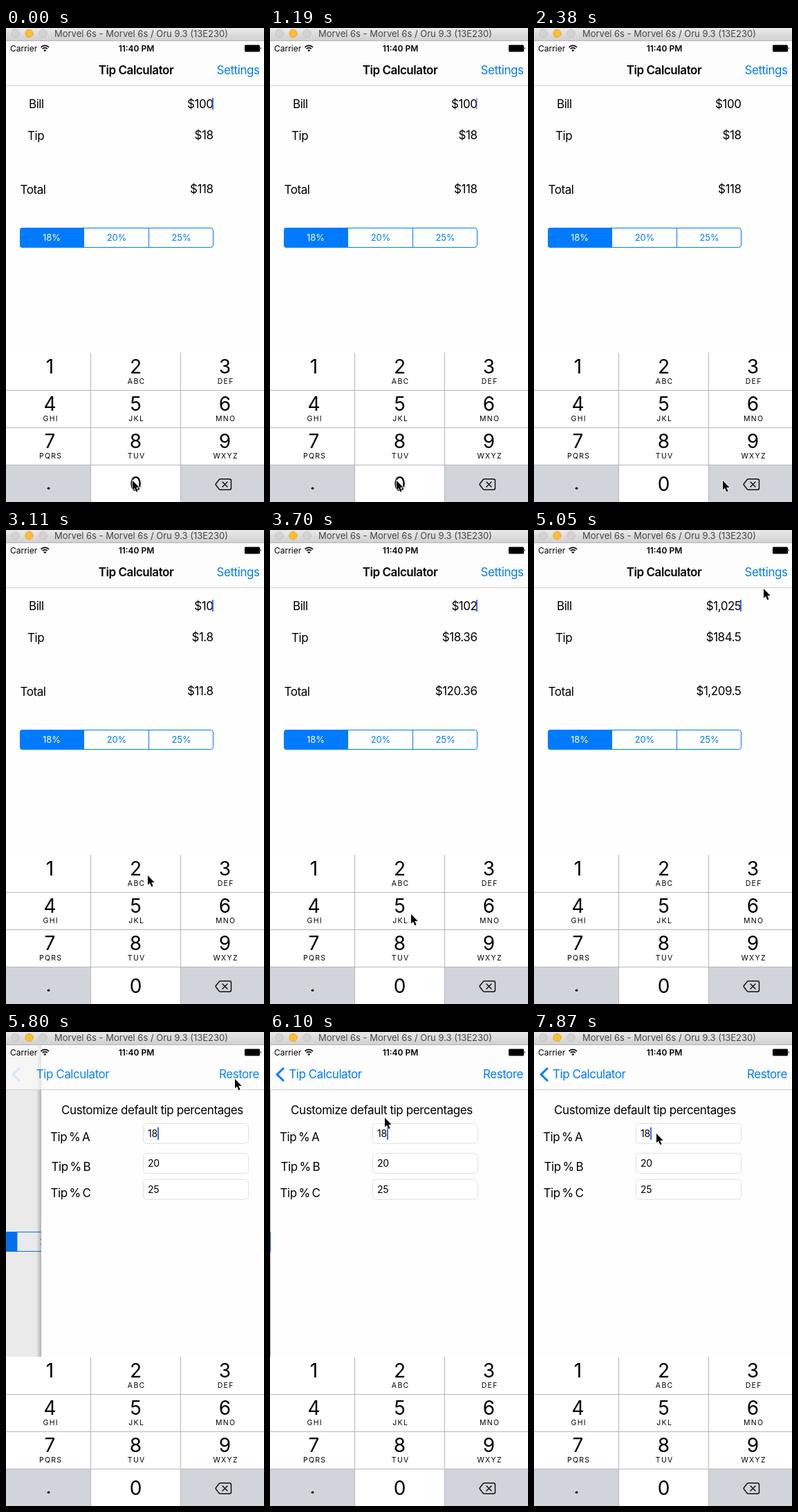
These frames come from a looping animation (373x686 px, 8 s). An HTML page:

```html
<!DOCTYPE html>
<html lang="en">
<head>
<meta charset="utf-8">
<title>Tip Calculator</title>
<style>
  html, body { margin: 0; width: 100%; height: 100%; overflow: hidden; background: #fefefe; }
  svg { display: block; }
  text { font-family: Inter, Roboto, sans-serif; font-size: 17px; letter-spacing: -.45px; white-space: pre; }
  .mid { text-anchor: middle; }
  .end { text-anchor: end; }
  .bold { font-weight: 600; }
  .blue { fill: #007aff; }
  .bar { font-size: 12px; letter-spacing: 0; }
  .seg { font-size: 13px; letter-spacing: -.1px; text-anchor: middle; }
  .head { letter-spacing: -.4px; text-anchor: middle; }
  .label { word-spacing: -1.5px; }
  .field { font-size: 14px; letter-spacing: -.2px; }
  .digit { font-size: 28px; letter-spacing: 0; text-anchor: middle; }
  .abc { font-size: 10.5px; letter-spacing: 1.3px; text-anchor: middle; }
  .line { fill: none; stroke: #007aff; }
  .caret { fill: #4169e8; }
</style>
</head>
<body>
<svg width="373" height="686" viewBox="0 0 373 686">
  <defs>
    <linearGradient id="chrome" x2="0" y2="1">
      <stop stop-color="#e9e9e9"/><stop offset="1" stop-color="#d0d0d0"/>
    </linearGradient>
    <linearGradient id="shade">
      <stop stop-color="#000" stop-opacity="0"/><stop offset="1" stop-color="#000" stop-opacity=".25"/>
    </linearGradient>
  </defs>
  <rect width="373" height="686" fill="#fefefe"/>

  <g id="home">
    <text x="33" y="116">Bill</text>
    <text x="31" y="162">Tip</text>
    <text x="20.5" y="240">Total</text>
    <text id="bill" class="end" x="299.5" y="116"></text>
    <text id="tip" class="end" x="299.5" y="161"></text>
    <text id="total" class="end" x="299.5" y="239"></text>
    <rect id="billCaret" class="caret" x="298" y="101" width="2" height="17"/>
    <path class="blue" d="M113 289H24a4 4 0 0 0-4 4v21a4 4 0 0 0 4 4h89z"/>
    <rect class="line" x="20.5" y="289.5" width="279" height="28" rx="3.5"/>
    <path class="line" d="M206.5 290v28"/>
    <text class="seg" x="66" y="308" fill="#fff">18%</text>
    <text class="seg blue" x="160" y="308">20%</text>
    <text class="seg blue" x="253.5" y="308">25%</text>
  </g>
  <rect id="dim" y="19" width="373" height="451"/>

  <g id="prefs">
    <rect x="-7" y="19" width="7" height="451" fill="url(#shade)"/>
    <rect y="19" width="373" height="451" fill="#fefefe"/>
    <text class="head" x="160.5" y="119">Customize default tip percentages</text>
    <g id="fields"></g>
    <rect id="fieldCaret" class="caret" x="168" y="138" width="2" height="18"/>
  </g>

  <rect y="19" width="373" height="64" fill="#fdfdfd" fill-opacity=".65"/>
  <rect y="83" width="373" height="1" fill="#cfcfcf"/>
  <text id="title" class="mid bold" y="67">Tip Calculator</text>
  <text id="settings" class="end blue" x="366.5" y="67">Settings</text>
  <path id="chevron" class="line" stroke-width="3" d="M20 52 10.3 61.5 20 71"/>
  <text id="back" class="blue" y="67">Tip Calculator</text>
  <text id="restore" class="end blue" x="366" y="67">Restore</text>

  <text class="bar" x="6" y="33.5">Carrier</text>
  <path d="M50.5 27.8a8 8 0 0 1 11.5 0M52.7 30.2a5 5 0 0 1 7.1 0" fill="none" stroke="#000" stroke-width="1.7"/>
  <path d="M56.25 34.3l-2-2.2a3 3 0 0 1 4 0z"/>
  <text class="bar bold mid" x="188.5" y="33.5">11:40 PM</text>
  <rect x="345" y="24.5" width="22" height="10" rx="1.5"/>
  <path d="M367.8 27.500q2 2 0 4z"/>

  <rect width="373" height="18.5" fill="url(#chrome)"/>
  <rect y="18" width="373" height="1" fill="#b5b5b5"/>
  <g stroke-width=".8">
    <circle cx="13.5" cy="8" r="5.7" fill="#d3d3d3" stroke="#bdbdbd"/>
    <circle cx="33.5" cy="8" r="5.7" fill="#fdbd2f" stroke="#e0a028"/>
    <circle cx="53.5" cy="8" r="5.7" fill="#d3d3d3" stroke="#bdbdbd"/>
  </g>
  <text class="mid" x="195.5" y="13" fill="#444" style="font-size:13px;letter-spacing:0">Morvel 6s - Morvel 6s / Oru 9.3 (13E230)</text>

  <g id="keys"></g>
  <path d="M0 524.5H373M0 578.5H373M0 632.5H373M122.5 470V686M252.5 470V686" stroke="#b4b5b8" fill="none"/>
  <circle cx="61.5" cy="666.3" r="1.8"/>
  <path d="M310 652.7h13q2.5 0 2.5 2.5v10.6q0 2.5-2.5 2.5h-13q-1 0-1.8-.9l-4.7-5.9q-.7-1 0-2l4.7-5.9q.8-.9 1.8-.9zM313 657l7 7M320 657l-7 7" fill="none" stroke="#111" stroke-width="1.5" stroke-linecap="round"/>

  <path id="mouse" d="M0 0V13.500L3 10.800 5.300 16.300 7.600 15.300 5.300 10H9.700Z" stroke="#fff" stroke-width="1.600" paint-order="stroke"/>
</svg>
<script>
const LOOP = 8000, BEAT = 148.5, W = 373; // the screen refreshes once per beat
const DEL = 11, GREY = '#d1d4da', WHITE = '#fff';

// all times below are in beats
const taps = [{ at: 17, key: DEL }, { at: 22, key: 2 }, { at: 30, key: 5 }];
const tapSettings = 36, openPrefs = 37.48, focusPrefs = 38;
const origin = [183, 655];
const moves = [ // from, to, x, y
  [11, 16, 273, 655], [18, 21, 205, 500], [23, 25, 204, 556], [31, 34, 332, 85],
  [34, 35, 331, 68], [39, 41, 166, 124], [44, 46, 174, 143], [49, 53, 177, 147]
];

const $ = id => document.getElementById(id);
const clamp = v => Math.max(0, Math.min(1, v));
const smooth = v => v * v * (3 - 2 * v);
const fade = (id, v) => $(id).setAttribute('opacity', clamp(v));
const move = (id, x, y = 0) => $(id).setAttribute('transform', `translate(${x} ${y})`);
const money = n => '$' + n.toLocaleString('en-US', { maximumFractionDigits: 2 });

const letters = ['', 'ABC', 'DEF', 'GHI', 'JKL', 'MNO', 'PQRS', 'TUV', 'WXYZ'];
const edges = [0, 123, 253, W];
$('keys').innerHTML = Array.from({ length: 12 }, (_, i) => {
  const c = i % 3, y = 470 + 54 * Math.floor(i / 3), x = 63.5 + 126.5 * c - c % 2 * 2.5;
  const digit = i < 9 ? i + 1 : i === 10 ? 0 : '';
  return `<rect x="${edges[c]}" y="${y}" width="${edges[c + 1] - edges[c]}" height="54"/>
    <text class="digit" x="${x}" y="${y + (i < 9 ? 30 : 37.5)}">${digit}</text>
    <text class="abc" x="${x + 1.2}" y="${y + 45}">${letters[i] || ''}</text>`;
}).join('');
const keyRects = $('keys').querySelectorAll('rect');

$('fields').innerHTML = [['A', 18, 132, 13, 158], ['B', 20, 175, 14.5, 201], ['C', 25, 213, 13.5, 239]]
  .map(([name, value, y, x, base]) => `<text class="label" x="${x}" y="${base}">Tip % ${name}</text>
    <rect x="147.5" y="${y + .5}" width="152" height="29" rx="5" fill="#fff" stroke="#e0e0e0"/>
    <text class="field" x="154" y="${y + 20}">${value}</text>`).join('');

// seven-beat blink that stays lit for a while after typing
function blink(age) {
  const d = Math.abs((age + 4) % 7 - 2.5);
  return clamp(d / 2 - .25);
}

// critically damped push, in whole pixels
function slide(n) {
  const s = 2.3 * Math.max(0, n - openPrefs);
  return Math.round(W * (1 + s) * Math.exp(-s));
}

function pointer(n) {
  let [px, py] = origin;
  for (const [from, to, x, y] of moves) {
    const k = smooth(clamp((n - from) / (to - from)));
    px += (x - px) * k;
    py += (y - py) * k;
  }
  return [px, py];
}

function draw(n) {
  const typed = taps.filter(tap => tap.at < n);
  const bill = +typed.reduce((s, { key }) => key === DEL ? s.slice(0, -1) : s + key, '100');
  $('bill').textContent = money(bill);
  $('tip').textContent = money(bill * .18);
  $('total').textContent = money(bill * 1.18);

  const lastKey = typed.length ? typed.at(-1).at + 1 : -3;
  fade('billCaret', n < tapSettings + 1 ? blink(n - lastKey) : 0);
  fade('fieldCaret', n < focusPrefs ? 1 : blink(n - focusPrefs));

  const held = taps.find(tap => tap.at === n)?.key;
  keyRects.forEach((r, i) => {
    const special = i === 9 || i === DEL;
    const pressed = held === (special ? i : i + 1);
    r.setAttribute('fill', special !== pressed ? GREY : WHITE);
  });

  const x = slide(n), p = 1 - x / W;
  move('home', -.3 * (W - x));
  move('prefs', x);
  $('prefs').style.display = p > 0 ? '' : 'none';
  fade('dim', .09 * p);
  $('title').setAttribute('x', 188 - 110 * p);
  $('back').setAttribute('x', 27 + .33 * x);
  fade('title', 1 - 1.5 * p);
  fade('back', p * 1.1);
  fade('chevron', (p - .845) / .15);
  fade('settings', n === tapSettings ? .3 : 1 - 1.2 * p);
  fade('restore', p * 1.1);
  move('mouse', ...pointer(n));
}

const start = performance.now();
function tick() {
  const t = (performance.now() - start) % LOOP;
  draw(Math.floor((t + 12) / BEAT));
  requestAnimationFrame(tick);
}
tick();
</script>
</body>
</html>
```
